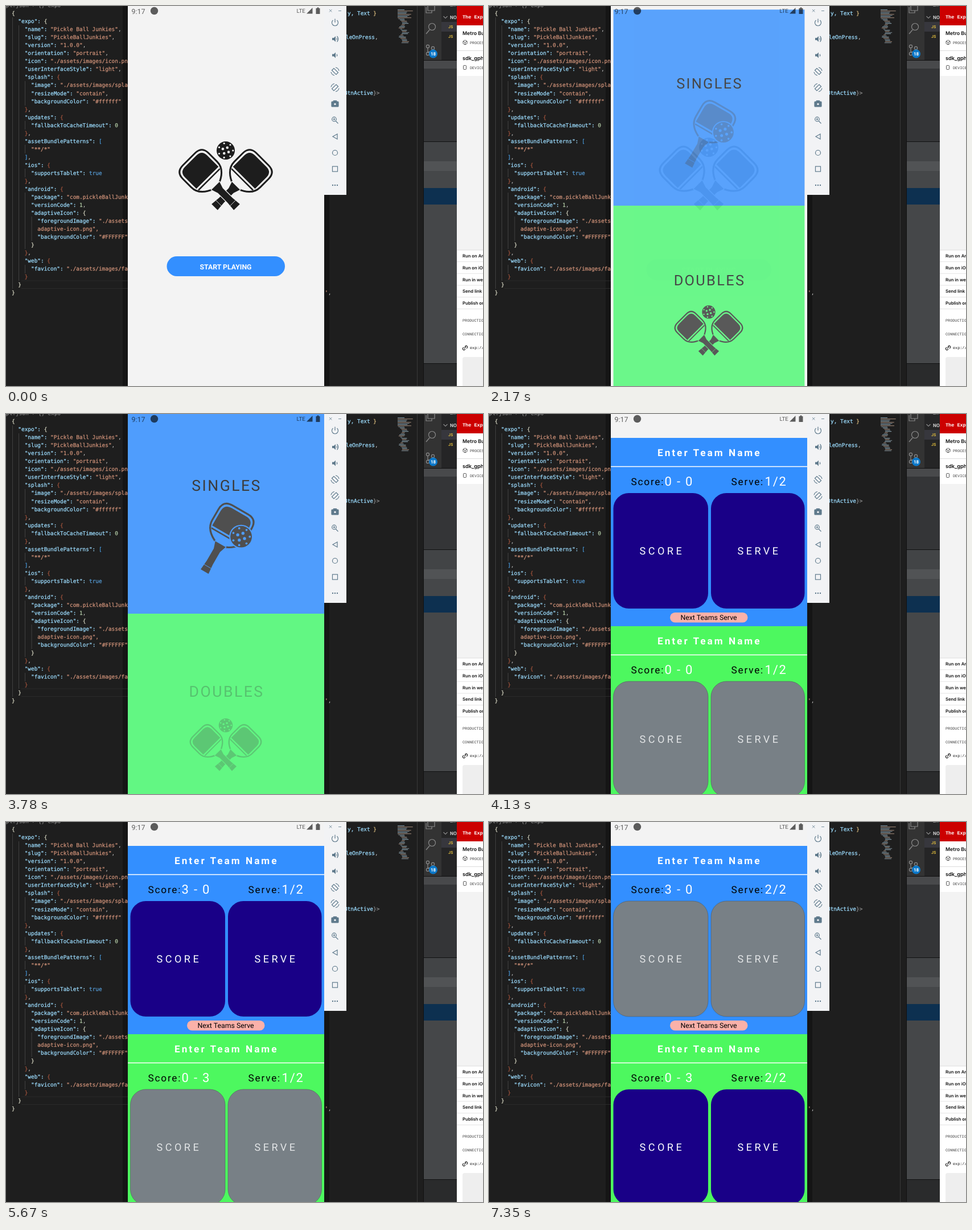
An HTML page for the animation above (8610 ms loop, 838 by 668 pixels).

```html
<!DOCTYPE html>
<html lang="en">
<head>
<meta charset="utf-8">
<title>Score keeper demo</title>
<style>
html, body { margin: 0; width: 100%; height: 100%; overflow: hidden; background: #1e1e1e; }
svg { display: block; width: 100vw; height: 100vh; }
text { white-space: pre; font-family: Roboto, sans-serif; text-rendering: geometricPrecision; }
.code text { font: 9.42px "DejaVu Sans Mono", monospace; fill: #d4d4d4; stroke-width: .25; }
.tools text { font: 600 7.7px Inter, sans-serif; fill: #111; }
.tools .mono { font: 6.8px "Liberation Mono", monospace; fill: #444; }
.line { fill: none; stroke-width: 1.2; }
</style>
</head>
<body>
<svg id="stage" viewBox="0 0 838 668" preserveAspectRatio="none"></svg>
<script>
const LOOP = 8610, STEP = 70;
const BLUE = '#338fff', GREEN = '#4df85f', MINT = '#49f870';
const NAVY = '#190087', GRAY = '#788086', PAPER = '#f3f3f3';

const rect = (x, y, w, h, fill, extra = '') =>
  `<rect x="${x}" y="${y}" width="${w}" height="${h}" fill="${fill}" ${extra}/>`;
const text = (x, y, content, extra = '') => `<text x="${x}" y="${y}" ${extra}>${content}</text>`;
const span = (color, content) => `<tspan fill="${color}" stroke="${color}">${content}</tspan>`;
const group = (attrs, ...parts) => `<g ${attrs}>${parts.join('')}</g>`;
const circle = (x, y, r, fill = 'currentColor') => `<circle cx="${x}" cy="${y}" r="${r}" fill="${fill}"/>`;
const path = (d, attrs = 'class="line"') => `<path d="${d}" ${attrs}/>`;

// ---- code editor on the left
const JSON_LINES = `{
  "expo": {
    "name": "Pickle Ball Junkies",
    "slug": "PickleBallJunkies",
    "version": "1.0.0",
    "orientation": "portrait",
    "icon": "./assets/images/icon.png",
    "userInterfaceStyle": "light",
    "splash": {
      "image": "./assets/images/splash.png",
      "resizeMode": "contain",
      "backgroundColor": "#ffffff"
    },
    "updates": {
      "fallbackToCacheTimeout": 0
    },
    "assetBundlePatterns": [
      "**/*"
    ],
    "ios": {
      "supportsTablet": true
    },
    "android": {
      "package": "com.pickleBallJunkies",
      "versionCode": 1,
      "adaptiveIcon": {
        "foregroundImage": "./assets/images/
        adaptive-icon.png",
        "backgroundColor": "#FFFFFF"
      }
    },
    "web": {
      "favicon": "./assets/images/favicon.png"
    }
  }
}`.split('\n');

function highlight(line) {
  const indent = line.search(/\S/);
  const color = token =>
    /:$/.test(token) ? '#9cdcfe' :
    /["/]/.test(token) ? '#ce9178' :
    token === 'true' ? '#569cd6' :
    /\d/.test(token) ? '#b5cea8' :
    /[[\]]/.test(token) ? '#4a9de0' :
    indent === 4 ? '#a0533c' : '#d4d4c0';
  return line.trim().replace(/[\w-]+\.png"$|[\w-]+\.png",$|"[^"]*"?:?|true|\d+|[{}[\]]/g,
    token => span(color(token), token));
}

function editor() {
  const lines = JSON_LINES.map((line, i) =>
    text(10 + line.search(/\S/) * 5.67, 16.4 + i * 14.01, highlight(line)));
  const guides = [[11.5, 20, 497], [22.5, 34, 483], [33.5, 132, 175], [33.5, 202, 217], [33.5, 244, 259],
    [33.5, 286, 301], [33.5, 328, 427], [45, 370, 413], [33.5, 455, 470]]
    .map(([x, top, bottom]) => path(`M${x} ${top}V${bottom}`, 'stroke="#404040"'));
  return group('class="code"', rect(0, 0, 214, 668, '#1e1e1e'), rect(205, 0, 9, 668, '#151515'),
    path('M27 483H214M27 496.5H214', 'stroke="#2b2b2b"'), ...guides,
    text(0, 2, 'pl.json › {} expo', 'style="fill:#999"'), ...lines);
}

// ---- windows on the right
function minimap() {
  let seed = 7;
  const random = () => (seed = seed * 16807 % 2147483647) / 2147483647;
  return Array.from({ length: 30 }, (_, i) => {
    const indent = 1 + 7 * Math.abs(Math.sin(i * .4));
    const width = i < 8 ? 12 + random() * 16 : 3 + random() * 10;
    return rect(688 + (i < 8 ? 0 : indent), 6 + i * 2, width, 1.2, ['#7f95a0', '#8d786a', '#6d7b83'][i % 3]);
  }).join('');
}

function rightEditor() {
  return group('class="code"', rect(559, 0, 174, 668, '#1e1e1e'), rect(559, 0, 9, 668, '#151515'),
    path('M722.5 0V668', 'stroke="#3a3a3a"'), minimap(),
    text(600, 15.5, span('#9cdcfe', 'y, Text') + ' ' + span('#d7ba7d', '}')),
    text(597, 58.4, span('#9cdcfe', 'leOnPress') + ','),
    text(594, 156.4, span('#9cdcfe', 'BtnActive') + span('#888', '}&gt;')),
    text(560, 507, span('#ce9178', '\'') + ','));
}

function sideWindows() {
  const js = y => text(777, y, 'JS', 'font-size="7" font-weight="700" fill="#d8b63c"');
  return rect(733, 0, 59, 96, '#333') + rect(765, 0, 27, 96, '#252526') + rect(765, 28, 27, 17, '#37373d') +
    rect(733, 95, 59, 143, '#343537') + rect(733, 95, 59, 15, '#48494b') +
    rect(733, 238, 59, 390, '#454749') + rect(733, 238, 59, 35, '#424446') + rect(733, 273, 59, 17, '#515355') +
    rect(733, 320, 59, 29, '#0d3050') + rect(733, 628, 59, 40, '#2a2b2c') +
    path('M733.5 0V668M733 95.5H792M733 238.5H792M733 628.5H792', 'stroke="#111"') +
    group('class="line" stroke="#8a8a8a"',
      path('M741-2V8H750M738 2V12H748V8M750 8H753V-2'), path('M744 42L738 49'),
      '<circle cx="748.5" cy="36.5" r="6"/><circle cx="741" cy="71" r="2.6"/><circle cx="750" cy="74" r="2.6"/><circle cx="741" cy="84" r="2.6"/>',
      path('M741 74V81M750 77Q749 80 741 81'), path('M768.5 18L772 21.5L775.5 18')) +
    circle(750.5, 84, 7.5, '#0b78c9') +
    text(750.5, 87, '18', 'font-size="8" font-weight="700" fill="#fff" text-anchor="middle"') +
    text(780, 1, 'EX', 'font-size="8" fill="#bbb"') +
    text(780, 23, 'NO', 'font-size="8.5" font-weight="700" fill="#ccc"') + js(39) + js(56);
}

function devTools() {
  const rows = ['Run on An', 'Run on iOS', 'Run in we', 'Send link', 'Publish or'];
  return group('class="tools"', rect(792, 0, 46, 668, '#fff'), rect(792, 0, 46, 34, '#cc0000'),
    text(802, 21.5, 'The Expo', 'class="mono" style="fill:#fff;font-size:8.5px;font-weight:700"'),
    text(802, 51, 'Metro Bu', 'style="font-size:8.8px"'), text(815, 67, 'PROCESS', 'class="mono"'),
    text(802, 95, 'sdk_gph', 'style="font-size:9.2px"'), text(815, 111, 'DEVICE', 'class="mono"'),
    path('M803 62L806.5 60L810 62V66L806.5 68L803 66ZM803 62L806.5 64L810 62M806.5 64V68',
      'class="line" stroke="#333" style="stroke-width:.8"'),
    rect(803.5, 104.5, 5, 7, 'none', 'rx="1" stroke="#333" stroke-width=".8"'),
    rect(792, 123, 46, 306, PAPER), path('M792 78.5H838M792 429H838', 'stroke="#ddd"'),
    ...rows.map((row, i) => text(802, 442 + i * 20.75, row) +
      path(`M792 ${449.5 + i * 20.75}H838`, 'stroke="#e4e4e4"')),
    text(802, 555, 'PRODUCTION', 'class="mono"'), text(802, 579, 'CONNECTION', 'class="mono"'),
    text(815, 603, 'exp://', 'class="mono" style="fill:#111"'),
    path('M805 602L808 599M804 600L803 601A2 2 0 0 0 806 604L807 603M806 599L807 598A2 2 0 0 1 810 601L809 602',
      'class="line" stroke="#333"'),
    rect(802, 617, 60, 60, '#eee', 'rx="4"'));
}

// ---- emulator toolbar
function toolbar() {
  const speaker = y => path(`M573 ${y - 2}h3l3-3v10l-3-3h-3z`, 'fill="currentColor" stroke="none"');
  const rotate = (y, side) => group(`transform="translate(578 ${y}) scale(${side} 1)"`,
    path('M-5.5-2L-2-5.5L5.5 2L2 5.5ZM1-7Q6-6 7-1M-1 7Q-6 6-7 1'));
  return rect(559, 0, 39, 332, '#f2f3f5') + group('color="#5f7a8c" stroke="#5f7a8c" class="line"',
    path('M568 6L572.5 10.5M572.5 6L568 10.5M584 8.5H589', 'class="line" style="stroke-width:.8"'),
    path('M578 22.5V29M574.5 25A5.5 5.5 0 1 0 581.5 25'),
    speaker(58), path('M581 56Q582.5 58 581 60M581.5 53Q586 58 581.5 63'),
    speaker(86.5), path('M581 84.5Q582.5 86.5 581 88.5'),
    rotate(115, 1), rotate(143.5, -1),
    rect(572, 168, 12, 9, 'currentColor', 'rx="1"'), rect(575.5, 166.5, 5, 2, 'currentColor'), circle(578, 172.5, 2.3, '#f2f3f5'),
    '<circle cx="576.5" cy="199" r="3.8"/>', path('M579 202L583.5 206.5M574.5 199H578.5M576.5 197V201'),
    path('M582 225V234L574 229.5Z'), '<circle cx="578" cy="258" r="4.5"/>',
    rect(573.5, 282, 9, 9, 'none'), ...[574, 578, 582].map(x => circle(x, 315, .6)));
}

// ---- phone artwork
function ball(x, y, r, holeColor) {
  const holes = Array.from({ length: 11 }, (_, i) => {
    const inner = i < 4, reach = r * (inner ? .36 : .8), angle = inner ? i * 1.57 + .5 : i * .898;
    return circle(x + Math.cos(angle) * reach, y + Math.sin(angle) * reach, r * (inner ? .14 : .1), holeColor);
  });
  return circle(x, y, r) + holes.join('');
}

const paddle = (x, y, angle, scale, back) =>
  group(`transform="translate(${x} ${y}) rotate(${angle}) scale(${scale})"`,
    path('M-15-32H15Q32-32 32-15V6C32 24 16 32 6 36H-6C-16 32-32 24-32 6V-15Q-32-32-15-32Z',
      'fill="none" stroke="currentColor" stroke-width="3"'),
    path('M-14-27.5H14Q27.5-27.5 27.5-14V14H-27.5V-14Q-27.5-27.5-14-27.5ZM-27 17H27L26 19.5H-26Z', 'fill="currentColor"'),
    path('M-10 34H10L6 46V70L7.5 87H-7.5L-6 70V46Z',
      `fill="currentColor" stroke="${back}" stroke-width="2.5" paint-order="stroke" stroke-linejoin="round"`),
    path('M-7 77H7', `stroke="${back}" stroke-width=".8"`));

const crossed = back => paddle(428, 292, 45, 1, back) + paddle(344, 292, -45, 1, back) + ball(386, 254, 16, back);

const home = () => rect(214, 0, 345, 668, PAPER) + group('color="#1d1d1d"', crossed(PAPER)) +
  group('id="start"', rect(282.5, 440, 207.5, 35, BLUE, 'rx="17.5"'),
    text(386, 462.6, 'START PLAYING', 'font-size="12.3" font-weight="700" fill="#fff" text-anchor="middle"'));

const modeTitle = (y, label) =>
  text(387.5, y, label, 'font-size="26" letter-spacing="2.4" fill="#1d1d1d" text-anchor="middle"');

const mode = () => rect(214, -3, 345, 354, BLUE) + rect(214, 351, 345, 354, MINT) +
  modeTitle(139.3, 'SINGLES') +
  group('id="single" color="#333"', paddle(394.5, 201, 30, 1.03, BLUE),
    circle(412.5, 218.6, 20.5, BLUE), ball(412.5, 218.6, 18.5, BLUE)) +
  group('id="doubles" color="#333"', modeTitle(494.3, 'DOUBLES'),
    group('transform="translate(386 543) scale(.75) translate(-386 -254)"', crossed(MINT)));

function team(id, y, color) {
  const pad = (x, w, label, labelX) => rect(x, 139, w, 203, NAVY, 'class="pad" rx="27"') +
    text(labelX, 247.3, label, 'class="pad-label" font-size="18" letter-spacing="4.5" fill="#fff"');
  const stat = (x, label, valueX, cls) =>
    text(x, 125, label, 'font-size="17.2" letter-spacing="1.8"') +
    text(valueX, 125.5, '', `class="${cls}" font-size="22" letter-spacing="1.8" fill="#fff"`);
  return group(`id="${id}" transform="translate(0 ${y})"`, rect(214, 42, 345, 331, color),
    text(296, 74, 'Enter Team Name', 'font-size="17.2" font-weight="700" letter-spacing="3" fill="#fff"'),
    rect(214, 91.7, 345, 1.5, '#fff'),
    stat(249.5, 'Score:', 308.5, 'score'), stat(425.5, 'Serve:', 484.5, 'serve'),
    pad(218.5, 166.5, 'SCORE', 264.5), pad(390, 164.5, 'SERVE', 436.5));
}

const play = () => rect(214, 0, 345, 668, PAPER) + team('blue', 0, BLUE) + team('green', 331, GREEN) +
  rect(318, 349, 136.5, 17.5, '#fbb1a9', 'rx="8.7"') +
  text(386, 362.3, 'Next Teams Serve', 'font-size="12.35" text-anchor="middle"');

const statusBar = () => group('opacity=".62"', text(220.5, 13.5, '9:17', 'font-size="12.4"'),
  circle(260.5, 8.5, 6.7, '#000'), text(510.5, 12.3, 'LTE', 'font-size="9.8"'),
  path('M538.5 3V13.5H528ZM544.5 4H546.5V2.5H549.5V4H551.5V14H544.5Z', 'fill="#000"'));

const stage = document.getElementById('stage');
stage.innerHTML = '<clipPath id="screen"><rect x="214" width="345" height="668"/></clipPath>' +
  editor() + rightEditor() + sideWindows() + devTools() + toolbar() +
  group('clip-path="url(#screen)"', rect(214, 0, 345, 668, PAPER),
    group('id="home"', home()), group('id="mode"', mode()), group('id="play"', play()), statusBar());

// ---- motion
const find = id => document.getElementById(id);
const ramp = (t, start, length) => Math.min(1, Math.max(0, (t - start) / length));
const settle = (t, start, length) => 1 - (1 - ramp(t, start, length)) ** 3.5;
const leave = p => p < 1 ? 1 - .95 * p ** 1.6 : 0;
const fade = (id, opacity) => find(id).setAttribute('opacity', opacity);

function pose(id, scale, opacity) {
  find(id).setAttribute('transform', `translate(386 351) scale(${scale}) translate(-386 -351)`);
  fade(id, opacity);
}

function showTeam(id, score, serve, active) {
  const root = find(id);
  root.querySelector('.score').textContent = score;
  root.querySelector('.serve').textContent = serve;
  root.querySelectorAll('.pad').forEach(pad => {
    pad.setAttribute('fill', active ? NAVY : GRAY);
    pad.setAttribute('stroke', active ? 'none' : 'rgba(70,80,85,.5)');
  });
  root.querySelectorAll('.pad-label').forEach(label => label.setAttribute('fill', active ? '#fff' : '#e2e4e6'));
}

function draw(t) {
  const toMode = settle(t, 1990, 460), toPlay = settle(t, 3740, 390);
  pose('home', 1 + .07 * toMode, leave(toMode));
  pose('mode', (.85 + .15 * toMode) * (1 + .07 * toPlay), ramp(t, 2030, 175) * leave(toPlay));
  pose('play', .85 + .15 * toPlay, ramp(t, 3780, 175));
  fade('start', 1 - .8 * ramp(t, 1680, 140));
  fade('single', ramp(t, 2080, 300));
  fade('doubles', 1 - .72 * ramp(t, 3150, 210));

  const points = [4970, 5390, 5600].filter(time => t >= time).length;
  const serve = t < 6090 ? '1/2' : '2/2';
  const blueServes = t < 7000;
  showTeam('blue', `${points} - 0`, serve, blueServes);
  showTeam('green', `0 - ${points}`, serve, !blueServes);
}

const began = performance.now();
function tick() {
  const t = (performance.now() - began) % LOOP;
  draw(Math.floor(t / STEP) * STEP);
  requestAnimationFrame(tick);
}
tick();
</script>
</body>
</html>
```
